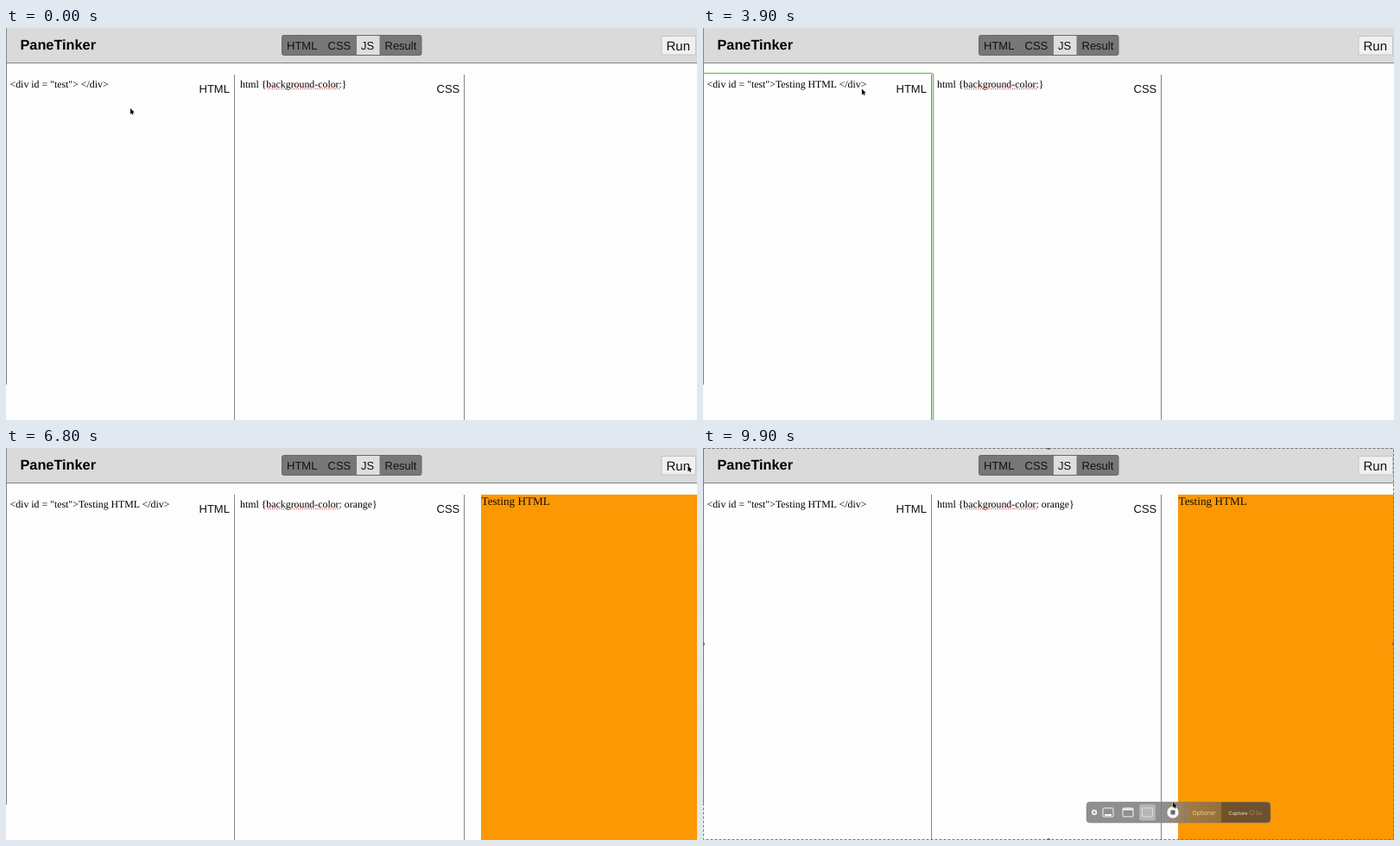
Recreate the animation shown at these times as an HTML page. Size 800x454 px, loop 10000 ms.

```html
<!DOCTYPE html>
<html lang="en">
<head>
<meta charset="utf-8">
<title>PaneTinker</title>
<style>
  html, body { margin: 0; width: 100%; height: 100%; overflow: hidden; background: #fdfdfd; }
  svg { display: block; width: 100%; height: 100%; }
  text { white-space: pre; text-rendering: geometricPrecision; }
  .ui { font: 13px "Liberation Sans", Arial, sans-serif; fill: #111; }
  .code { font: 11.85px "Liberation Serif", Times, serif; fill: #000; }
  .tiny { font: 6.9px Inter, sans-serif; fill: #f6cf8c; }
  .rule { stroke: #858585; }
  .ring { fill: none; stroke: #86bd78; }
  .icon { fill: none; stroke: #f4f4f4; }
</style>
</head>
<body>
<svg viewBox="0 0 800 454">
  <defs>
    <linearGradient id="glass">
      <stop offset=".44" stop-color="#8f8f8f"/>
      <stop offset=".56" stop-color="#a07a42"/>
      <stop offset=".73" stop-color="#94703c"/>
      <stop offset=".735" stop-color="#705129"/>
      <stop offset="1" stop-color="#6c5232"/>
    </linearGradient>
  </defs>

  <rect width="800" height="454" fill="#fdfdfd"/>
  <rect width="800" height="40" fill="#dadada"/>
  <path class="rule" d="M0 40.5H800M264.5 54V454M530.5 54V454M.5 0V413"/>
  <text class="ui" x="16.5" y="24.5" style="font-size:16.3px;font-weight:bold;fill:#000">PaneTinker</text>

  <rect x="319.5" y="8.5" width="161.5" height="23" rx="2" fill="#777" stroke="#686868"/>
  <rect x="406" y="9" width="26.5" height="22" fill="#dedede"/>
  <g class="ui">
    <text x="325" y="25">HTML</text>
    <text x="372.5" y="25">CSS</text>
    <text x="411" y="25">JS</text>
    <text x="438.5" y="25">Result</text>
    <text x="223.5" y="75">HTML</text>
    <text x="498.5" y="75">CSS</text>
  </g>

  <rect id="button" x="759" y="9.5" width="39.5" height="21.5"/>
  <text id="run" class="ui" x="764.5" y="26" style="font-size:15px">Run</text>

  <g id="result">
    <rect x="550" y="54" width="250" height="400" fill="#fc9803"/>
    <text class="code" x="550.5" y="66" style="font-size:13.2px;fill:#1a0f00">Testing HTML</text>
  </g>

  <rect id="htmlRing" class="ring" x="-4" y="52.5" width="270.5" height="420" rx="2"/>
  <rect id="cssRing" class="ring" x="265.5" y="52.5" width="267" height="420" rx="2"/>
  <text id="htmlCode" class="code" xml:space="preserve" x="4.5" y="69"></text>
  <text id="cssCode" class="code" xml:space="preserve" x="271" y="69"></text>
  <path d="M303 70.5H387" stroke="#cf4a4a" stroke-width="1.2" stroke-dasharray="1.2 1.3"/>
  <path id="caret" d="M.5 58.5V72" stroke="#333" stroke-width=".9"/>

  <g id="capture">
    <rect x=".5" y=".5" width="799" height="453" fill="none" stroke="#777" stroke-dasharray="3 2"/>
    <g fill="#666">
      <circle cx="400" cy="0" r="2"/><circle cx="400" cy="454" r="2"/>
      <circle cx="0" cy="227" r="2"/><circle cx="800" cy="227" r="2"/>
    </g>
    <rect x="444" y="410" width="213" height="24" rx="4" fill="url(#glass)" stroke="#7c7870" stroke-width=".5"/>
    <circle cx="453" cy="422" r="3.2" fill="#eee"/>
    <path d="M451.8 420.8l2.4 2.4m0-2.4l-2.4 2.4" stroke="#777" stroke-width=".8"/>
    <rect x="505" y="412.5" width="19" height="19" rx="2" fill="#b5b5b5"/>
    <g class="icon">
      <rect x="463" y="417" width="12" height="10" rx="1"/>
      <path d="M465 425H473" stroke-width="2"/>
      <rect x="486" y="417" width="12" height="10" rx="1"/>
      <path d="M486 418.5H498" stroke-width="2"/>
      <rect x="508.5" y="417" width="12" height="10" stroke-dasharray="1.5 1"/>
    </g>
    <path d="M530.5 411V433M557.5 411V433" stroke="#777" stroke-width=".6"/>
    <circle cx="544" cy="422" r="6.7" fill="#f6f6f6"/>
    <rect x="541.5" y="419.5" width="5" height="5" rx=".7" fill="#666"/>
    <text class="tiny" x="566.5" y="424.5">Options</text>
    <path d="M591 421.5l1.5 1.5 1.5-1.5" fill="none" stroke="#f6cf8c" stroke-width=".8"/>
    <text class="tiny" x="608.5" y="424.5" style="font-size:5.8px;fill:#eee2cf">Capture</text>
    <g opacity=".45">
      <circle cx="635.5" cy="422.3" r="2.4" fill="none" stroke="#f6cf8c" stroke-width=".7"/>
      <text class="tiny" x="640" y="424.5" style="font-size:6.2px">5s</text>
    </g>
  </g>

  <circle id="click" cx="789.5" cy="21" fill="none" stroke="#444"/>
  <path id="mouse" d="M0 0V6.7L1.5 5.4 2.5 7.6 3.6 7.1 2.7 5 4.7 4.8Z" stroke="#fff" stroke-width=".8" paint-order="stroke"/>
</svg>
<script>
const LOOP = 10000, STEP = 100;
const el = id => document.getElementById(id);
const show = (id, on) => el(id).setAttribute("visibility", on ? "visible" : "hidden");
const set = (id, attrs) => { for (const k in attrs) el(id).setAttribute(k, attrs[k]); };
const within = (t, from, to) => t >= from && t < to;
const clamp = v => Math.min(1, Math.max(0, v));
const smooth = v => v * v * (3 - 2 * v);

const panes = {
  html: {
    x: 4.5, before: '<div id = "test">', typed: "Testing HTML", after: " </div>",
    keys: [1100, 1800, 2000, 2100, 2200, 2400, 2500, 2600, 2900, 3100, 3200, 3300],
    focus: [400, 4800], caretOff: [[400, 500], [700, 900], [3700, 4200]]
  },
  css: {
    x: 271, before: "html {background-color:", typed: " orange", after: "}",
    keys: [5200, 5500, 5600, 5700, 5800, 5900, 6000],
    focus: [4800, 6600], caretOff: []
  }
};

// Pointer strokes: start, end, from, to, and when the pointer disappears.
const strokes = [
  [0, 100, 144, 93, 125, 78, 300],
  [300, 400, 100, 70, 85, 65, 900],
  [3700, 4700, 160, 71, 389.5, 66, 5200],
  [6100, 6500, 440, 68, 789.5, 20.5, 9100],
  [9100, 9800, 789.5, 20.5, 544, 410, LOOP]
];

function drawPane(name, t) {
  const { x, before, typed, after, keys, focus, caretOff } = panes[name];
  const count = keys.filter(k => k <= t).length;
  const text = el(name + "Code");
  const prefix = before + typed.slice(0, count);
  if (text.textContent !== prefix + after) text.textContent = prefix + after;

  const focused = within(t, ...focus);
  show(name + "Ring", focused);
  set(name + "Ring", { "stroke-width": t - focus[0] < STEP ? 3 : 1.6 });
  if (focused && !caretOff.some(span => within(t, ...span))) {
    show("caret", true);
    set("caret", { transform: `translate(${x + text.getSubStringLength(0, prefix.length)} 0)` });
  }
}

function draw(t) {
  show("caret", false);
  drawPane("html", t);
  drawPane("css", t);

  const pressed = within(t, 6600, 6800);
  set("button", { fill: pressed ? "#b8b8b8" : "#f0f0f0", stroke: pressed ? "#b8b8b8" : "#c4c4c4" });
  el("run").style.fill = pressed ? "#fff" : "#111";
  show("click", pressed);
  set("click", { r: t < 6700 ? 7 : 10 });
  show("result", t >= 6800);
  set("capture", { opacity: clamp((t - 9000) / 300) });

  const stroke = strokes.find(s => within(t, s[0], s[6]));
  show("mouse", stroke);
  if (stroke) {
    const [start, end, x0, y0, x1, y1] = stroke;
    const p = smooth(clamp((t - start) / (end - start)));
    set("mouse", { transform: `translate(${x0 + (x1 - x0) * p} ${y0 + (y1 - y0) * p})` });
  }
}

function tick() {
  draw(Math.floor(performance.now() % LOOP / STEP) * STEP);
  requestAnimationFrame(tick);
}
tick();
</script>
</body>
</html>
```
